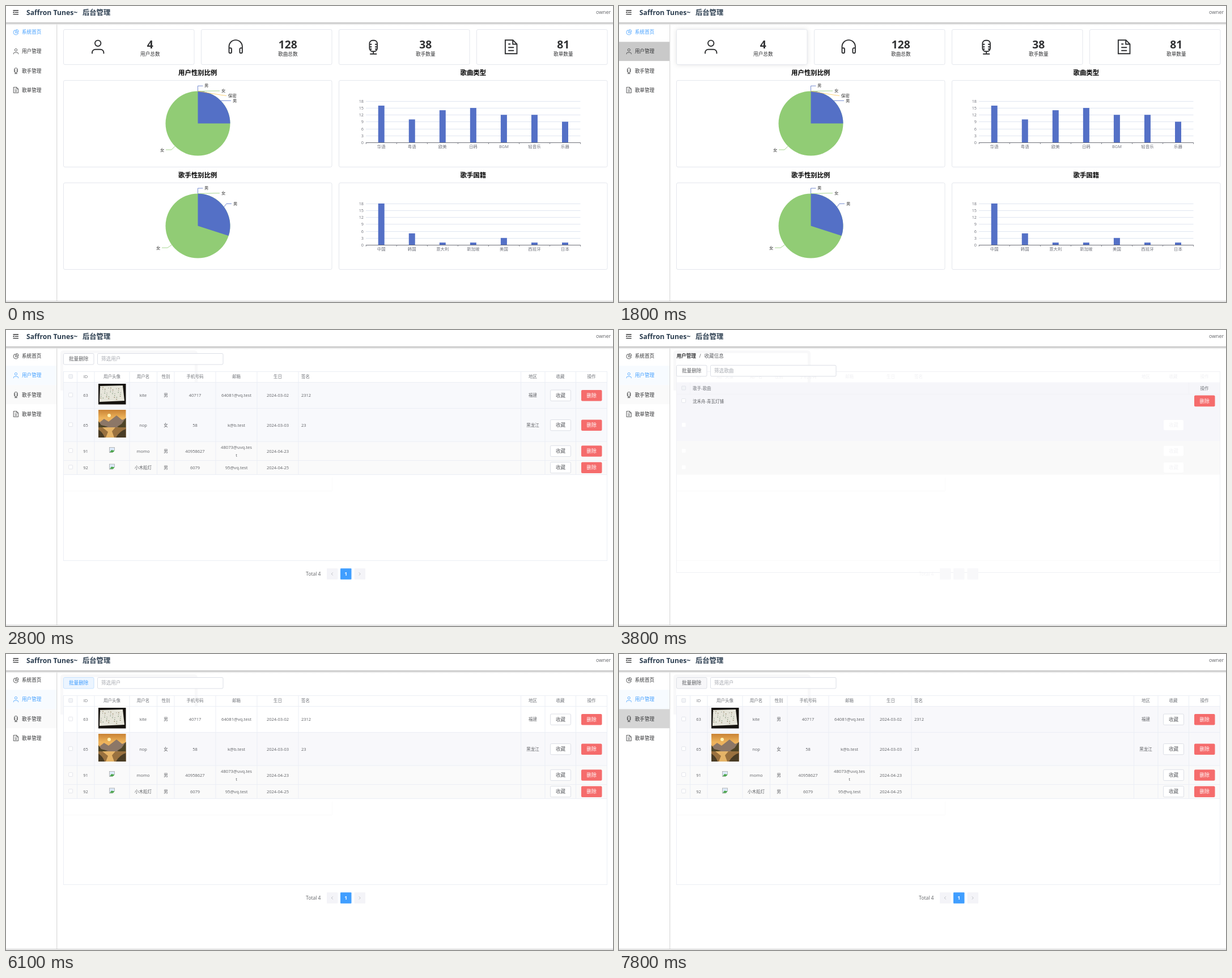
Animation, 1071 px wide and 523 px high, one loop 8000 ms. Source, as an HTML page:

```html
<!DOCTYPE html>
<html lang="zh">
<head>
<meta charset="utf-8">
<title>后台管理</title>
<style>
html, body { margin: 0; width: 100%; height: 100%; overflow: hidden; background: #fff; }
svg { display: block; width: 1071px; height: 523px; font-family: "Open Sans", "Noto Sans CJK SC", "Noto Sans CJK", sans-serif; }
text { white-space: pre; }
</style>
</head>
<body>
<svg id="stage" viewBox="0 0 1071 523"></svg>
<script>
const LOOP = 8000, BLUE = '#409eff', INK = '#303133', GREY = '#606266', LINE = '#ebeef5';

// Drawing helpers, all returning SVG markup
const text = (x, cy, s, size, fill = GREY, anchor = 'middle', extra = '') =>
  `<text x="${x}" y="${cy + size * .37}" font-size="${size}" fill="${fill}" text-anchor="${anchor}" ${extra}>${s}</text>`;
const box = (x, y, x2, y2, fill = 'none', stroke = 'none', r = 0, extra = '') =>
  `<rect x="${x}" y="${y}" width="${x2 - x}" height="${y2 - y}" rx="${r}" fill="${fill}" stroke="${stroke}" ${extra}/>`;
const path = (d, stroke, w = 1, extra = '') =>
  `<path d="${d}" fill="none" stroke="${stroke}" stroke-width="${w}" ${extra}/>`;
const group = (id, body, extra = '') => `<g id="${id}" ${extra}>${body}</g>`;

// Icons are centred on 0,0 in a 24 px square
const ICONS = {
  pie: 'M-2-9.5A10.5 10.5 0 1 0 10 3H-2ZM2.5-11.5A9.5 9.5 0 0 1 11.5-2H2.5Z',
  person: 'M-5.2-6.5a5.2 5.2 0 1 0 10.4 0a5.2 5.2 0 1 0-10.4 0M-10.2 12v-2a5.5 5.5 0 0 1 5.5-5.5h9.4a5.5 5.5 0 0 1 5.5 5.5v2',
  phones: 'M-11.7 4v-4.5a11.7 11.7 0 0 1 23.4 0V4M-11.7 2h2.5a2 2 0 0 1 2 2v5a2 2 0 0 1-2 2h-.5a2 2 0 0 1-2-2ZM11.7 2h-2.5a2 2 0 0 0-2 2v5a2 2 0 0 0 2 2h.5a2 2 0 0 0 2-2Z',
  mic: 'M-6.8-6a5.5 5.5 0 0 1 5.5-5.5h2.6a5.5 5.5 0 0 1 5.5 5.5v8.5a5.5 5.5 0 0 1-5.5 5.5h-2.6a5.5 5.5 0 0 1-5.5-5.5ZM-6.8-4.5h4M2.8-4.5h4M-6.8 0h4M2.8 0h4M-6.8 4h4M2.8 4h4M0 8v4.5M-6 12.5H6',
  doc: 'M-10.3-12h13.5l7.1 7V12h-20.6ZM3-12v7.2h7M-5-5h4M-5 1h10M-5 6.5h10'
};
const icon = (name, x, y, k = 1, stroke = 'currentColor') =>
  `<g transform="translate(${x} ${y}) scale(${k})">${path(ICONS[name], stroke, 1.9)}</g>`;

function frame() {
  const items = [['pie', '系统首页'], ['person', '用户管理'], ['mic', '歌手管理'], ['doc', '歌单管理']];
  const menu = items.map(([name, label], i) => {
    const y = 46.2 + 34.1 * i;
    return box(0, y - 17, 89, y + 17, '#fff', 'none', 0, `id="row${i}"`) +
      group('item' + i, icon(name, 17.5, y, .41) + text(28, y, label, 8.6, 'currentColor', 'start'), `color="${INK}"`);
  }).join('');
  return menu +
    path('M89.5 30V521', '#dcdcdc') + path('M90.5 30V521', '#f4f4f4') +
    box(0, 0, 1071, 29, '#fff') +
    box(0, 29, 1071, 35, 'url(#shade)') +
    path('M12.5 8H22M15.5 11.3H22M12.5 14.6H22', INK, 1.3) + '<path d="M12 11.3l2.4-1.7v3.4z" fill="#303133"/>' +
    text(36, 11.5, 'Saffron Tunes~', 12.2, '#2c3e50', 'start', 'font-weight="700"') +
    text(135, 11.5, '后台管理', 12.3, '#2c3e50', 'start', 'font-weight="700"') +
    text(1067, 11, 'owner', 8.8, GREY, 'end') +
    path('M0 521.5H1071', '#c4c4c4');
}

function pie(cy, share, labels) {
  const cx = 338.5, r = 57, a = share * 2 * Math.PI;
  const x = cx + r * Math.sin(a), y = cy - r * Math.cos(a);
  return `<circle cx="${cx}" cy="${cy}" r="${r}" fill="#91cc75"/>` +
    `<path d="M${cx} ${cy}V${cy - r}A${r} ${r} 0 0 1 ${x} ${y}Z" fill="#5470c6"/>` +
    labels.map(([d, stroke, tx, ty, s, anchor = 'start']) =>
      path(d, stroke, .8) + text(tx, ty, s, 7.4, '#333', anchor)).join('');
}

function bars(base, values, names) {
  let out = '';
  for (let i = 0; i <= 6; i++) {
    const y = Math.round(base - i * 12.17) + .5;
    if (i) out += path(`M635 ${y}H1013.5`, '#e0e6f1');
    out += text(631, y - .5, i * 3, 7.3, '#6e7079', 'end');
  }
  values.forEach((v, i) => {
    const x = 662.2 + 54.05 * i;
    out += box(x - 5.5, base - v * 4.06, x + 5.5, base, '#5470c6') + text(x, base + 7.5, names[i], 7.4, '#6e7079');
  });
  out += path(`M635 ${base + .5}H1013.5`, '#6e7079');
  for (let i = 0; i < 8; i++) out += path(`M${635.3 + i * 54.05} ${base}v3`, '#6e7079', .8);
  return out;
}

function home() {
  const cards = [['person', 4, '用户总数'], ['phones', 128, '歌曲总数'], ['mic', 38, '歌手数量'], ['doc', 81, '歌单数量']];
  const titles = ['用户性别比例', '歌曲类型', '歌手性别比例', '歌手国籍'];
  let out = box(101.5, 41.5, 332, 103.5, '#fff', 'none', 2, 'id="glow" style="filter:drop-shadow(0 0 4px rgba(0,0,0,.12))"');
  cards.forEach(([name, n, label], i) => {
    const x = 101.5 + 243 * i;
    out += box(x, 41.5, x + 230.5, 103.5, '#fff', '#e4e7ed', 2.5) + icon(name, x + 60.7, 72.3, 1, INK) +
      text(x + 152.8, 67.8, n, 19.3, INK, 'middle', 'font-weight="700"') + text(x + 152.8, 85.3, label, 8.6, INK);
  });
  titles.forEach((s, i) => {
    const x = i % 2 ? 587.5 : 101.5, y = i > 1 ? 312 : 131;
    out += text(x + 236.8, y - 13.2, s, 11.4, '#000', 'middle', 'font-weight="700"') +
      box(x, y + .5, x + 473.5, y + 153.5, '#fff', '#e4e7ed', 2.5);
  });
  const b = '#5470c6', g = '#91cc75', y = '#fac858';
  return out +
    pie(207.5, .25, [
      ['M338.5 150.5V141.2H347.5', b, 350, 140.5, '男'],
      ['M338.5 150.5L369 150H377', g, 380, 149, '女'],
      ['M338.5 150.5L381 157.5L389 158.5', y, 392, 158, '保密'],
      ['M378.8 167.2H397', b, 400, 166.8, '男'],
      ['M298.2 247.8L292 254H282', g, 279.5, 253.8, '女', 'end']]) +
    pie(388.5, .3, [
      ['M338.5 331.5V322H347.5', b, 350, 321.3, '男'],
      ['M338.5 331.5L369 330.7H377', g, 380, 329.8, '女'],
      ['M384.6 355L389 349.3H398', b, 401, 349, '男'],
      ['M292.4 422L285 427.2H275', g, 272.5, 426.8, '女', 'end']]) +
    bars(241, [16, 10, 14, 15, 12, 12, 9], ['华语', '粤语', '欧美', '日韩', 'BGM', '轻音乐', '乐器']) +
    bars(422, [18, 5, 1, 1, 3, 1, 1], ['中国', '韩国', '意大利', '新加坡', '美国', '西班牙', '日本']);
}

const check = (y, fill = '#fff') => box(110.7, y - 3.4, 117.6, y + 3.4, fill, '#dcdfe6', 1, 'stroke-width=".8"');
const remove = y => box(1015, y - 9.8, 1051.5, y + 9.8, '#f56c6c', 'none', 2) + text(1033.2, y, '删除', 8.6, '#fff', 'middle', 'font-weight="500"');
const halo = path('M98.5 107V42Q98.5 38.5 102 38.5H331Q335.5 38.5 335.5 42V104', '#f8f8f9', 5) +
  path('M102 284.5H575.5V261', '#fafafa');
const toolbar = (y, hint, id) =>
  box(101.5, y, 155, y + 19.5, '#fff', '#dcdfe6', 2, `id="${id}"`) +
  text(128.2, y + 9.8, '批量删除', 8.6, GREY, 'middle', `id="${id}Text"`) +
  box(161.5, y, 383, y + 19.5, '#fff', '#dcdfe6', 2) + text(168, y + 9.8, hint, 8.6, '#a8abb2', 'start');

const HEAD = [[140.5, 'ID'], [187, '用户头像'], [242, '用户名'], [282, '性别'], [333.5, '手机号码'], [406.5, '邮箱'],
  [479.5, '生日'], [528.5, '签名'], [929.5, '地区'], [978, '收藏'], [1033, '操作']];
const head = fill => HEAD.map(([x, s]) => text(x, 82.7, s, 7.5, fill, 'middle', 'font-weight="500"')).join('');

function pictures() {
  const specks = [];
  for (let i = 0; i < 34; i++) {
    const x = 167 + (i * 17.3) % 38, y = 101.5 + (i * 7.7) % 22;
    specks.push(`<circle cx="${x}" cy="${y}" r="${.5 + i % 3 * .25}" fill="${['#555', '#6d8b6a', '#a89a80'][i % 3]}"/>`);
  }
  return box(163, 95, 211.5, 131.5, '#16130f') +
    '<path d="M166 99L206 98L209 125L165 127Z" fill="#e6e5da"/>' + specks.join('') +
    box(163, 141, 211.5, 190, 'url(#dusk)') + '<circle cx="182" cy="151" r="3" fill="#fff0b0"/>' +
    '<path d="M163 165L173 157L181 162L195 151L205 159L211.5 156V172H163Z" fill="#8c7767"/>' +
    '<path d="M163 161L168 168L180 171L163 174ZM211.5 155L204 166L196 171L211.5 176Z" fill="#4d4427"/>' +
    box(163, 172, 211.5, 190, '#99713f') + '<path d="M170 172H193L187 179L191 190H176L180 180Z" fill="#e5b468"/>' +
    '<path d="M163 176Q171 181 174 190H163ZM211.5 175Q201 178 194 190H211.5Z" fill="#493c25"/>' +
    [212, 241.5].map(y => box(182.5, y - 4.5, 191.5, y + 4.5, '#dce9f8', '#aaa', 0, 'stroke-width=".8"') +
      `<path d="M183 ${y + 4}l3-4 5 1v3z" fill="#4ea64e"/><path d="M188 ${y + 5}l4-4v4z" fill="#fff"/>`).join('');
}

function people() {
  const rows = [
    [115.5, 63, 'kite', '男', '40717', ['64081@vq.test'], '2024-03-02', '2312', '福建'],
    [168, 65, 'nop', '女', '58', ['k@b.test'], '2024-03-03', '23', '黑龙江'],
    [213.8, 91, 'momo', '男', '40958627', ['48073@uvq.tes', 't'], '2024-04-23', '', ''],
    [243, 92, '小木船灯', '男', '6079', ['95@vq.test'], '2024-04-25', '', '']];
  const ys = [92.5, 138.5, 197, 230.5, 255.5];
  let out = halo + toolbar(41.5, '筛选用户', 'btn') + box(101.5, 73.5, 1060.5, 407.5, 'none', LINE);
  rows.forEach((r, i) => out += box(102, ys[i], 1060, ys[i + 1], '#fff', 'none', 0, `id="band${i}"`));
  ys.forEach(y => out += path(`M102 ${y}H1060`, LINE));
  [125.5, 156, 218, 266.5, 297, 370, 443, 516, 908.5, 951, 1005.5].forEach(x => out += path(`M${x} 73V255.5`, LINE));
  out += check(82, '#f2f4f7') + head('#73767c') + pictures();
  rows.forEach(([y, id, name, sex, phone, mail, born, sign, area], i) => {
    [[140.5, id], [242, name], [282, sex], [333.5, phone], [479.5, born], [929.5, area]]
      .forEach(([x, s]) => out += text(x, y, s, 7.5));
    mail.forEach((s, k) => out += text(406.5, y + (k - (mail.length - 1) / 2) * 14, s, 7.7));
    out += text(521, y, sign, 7.5, GREY, 'start') + check(y - .8) +
      box(960.5, y - 9.5, 996.5, y + 9.8, '#fff', '#dcdfe6', 2, `id="fav${i}"`) +
      text(978.5, y + .2, '收藏', 8.6, GREY, 'middle', `id="favText${i}"`) + remove(y + .2);
  });
  [566, 590, 614.5].forEach((x, i) => out += box(x, 421.3, x + 19.5, 440.7, i == 1 ? BLUE : '#f4f4f8', 'none', 1));
  return out + text(542.3, 431, 'Total 4', 8.6) +
    text(599.7, 431, '1', 8.6, '#fff', 'middle', 'font-weight="700"') +
    path('M576.7 428.5l-2.5 2.5 2.5 2.5M622.8 428.5l2.5 2.5-2.5 2.5', '#b6b9c0', .9);
}

function songs() {
  let out = halo + box(102, 92.5, 1060, 196, '#f6f6fa') + box(102, 196, 1060, 255.5, '#f9f9f9') + head('#f0f0f3') +
    path('M102 73.5H1060M102 113.5H1060M125.5 93V113M1005.5 93V113', '#f1f2f6') +
    path('M102 407.5H1060', '#fafafa') + box(101.5, 73.5, 1060.5, 428.5, 'none', '#f0f1f5');
  [168, 213.8, 243].forEach(y => out += box(961, y - 9, 996, y + 9, '#fff', 'none', 2) +
    text(978.5, y, '收藏', 8.6, '#f3f3f5') + box(111, y - 4, 117.5, y + 3, '#fff', 'none', 1));
  [566, 590, 614.5].forEach(x => out += box(x, 421.3, x + 19.5, 440.7, '#f8f8fa', 'none', 1));
  return out + text(542.3, 431, 'Total 4', 8.6, '#f4f4f6') +
    text(101.5, 45.8, '用户管理', 8.6, INK, 'start', 'id="crumb" font-weight="700"') +
    text(143, 45.8, '/', 8.6, GREY) + text(150.5, 45.8, '收藏信息', 8.6, GREY, 'start') +
    toolbar(62.3, '筛选歌曲', 'btn2') +
    check(102.5, '#f2f4f7') + check(124.8) + text(130, 103.2, '歌手-歌曲', 7.5, '#73767c', 'start', 'font-weight="500"') +
    text(1033, 103.2, '操作', 7.5, '#73767c') + text(130, 125.8, '沈禾舟-青瓦灯铺', 7.5, GREY, 'start') + remove(125.4);
}

const stage = document.getElementById('stage');
stage.innerHTML = `<defs>
<linearGradient id="shade" x2="0" y2="1"><stop stop-color="#bdbdbd"/><stop offset=".35" stop-color="#d5d5d5"/><stop offset="1" stop-color="#fff" stop-opacity="0"/></linearGradient>
<linearGradient id="dusk" x2="0" y2="1"><stop stop-color="#c98234"/><stop offset=".3" stop-color="#eeb45b"/><stop offset=".7" stop-color="#dca36a"/></linearGradient>
</defs>` + group('home', home()) + group('people', people()) + group('songs', songs()) + frame();

// [id, attribute, time, value, time, value, ...]; each value holds until the next
const TRACKS = [
  ['home', 'display', 0, 'inline', 2000, 'none'],
  ['people', 'display', 0, 'none', 2000, 'inline', 3600, 'none', 6100, 'inline'],
  ['songs', 'display', 0, 'none', 3600, 'inline', 6100, 'none'],
  ['glow', 'opacity', 0, 0, 500, 1],
  ['row1', 'fill', 0, '#fff', 500, '#f5f5f5', 1100, '#e3e3e3', 1200, '#d6d6d6', 1300, '#d0d0d0', 1700, '#cbcbcb',
    1800, '#c9c9c9', 2100, '#dde2e7', 2200, '#ecf2f8', 2300, '#f7fbff'],
  ['row2', 'fill', 0, '#fff', 300, '#f5f5f5', 500, '#fff', 2200, '#f4f4f4', 2400, '#fafafa', 7800, '#d5d5d5'],
  ['item0', 'color', 0, BLUE, 2000, '#34506c', 2100, INK],
  ['item1', 'color', 0, INK, 2000, '#3a78b2', 2100, BLUE],
  ['band0', 'fill', 0, '#fff', 2200, '#f8f9fc', 6100, '#fff', 6300, '#f8f8fb'],
  ['band1', 'fill', 0, '#fff', 2300, '#f8f9fc', 6100, '#f8f8fb'],
  ['band2', 'fill', 0, '#fff', 2300, '#fafafa'],
  ['band3', 'fill', 0, '#fff', 2400, '#fafafa'],
  ['favText0', 'fill', 0, GREY, 3300, '#5080b2', 3400, BLUE, 3600, GREY],
  ['fav0', 'fill', 0, '#fff', 3300, '#f5faff', 3400, '#ecf5ff', 3600, '#fff'],
  ['btn2', 'fill', 0, '#fff', 5600, '#ecf5ff', 5800, '#fff'],
  ['btn2Text', 'fill', 0, GREY, 5600, BLUE, 5800, GREY],
  ['crumb', 'fill', 0, INK, 5800, '#3868a0', 5900, BLUE],
  ['btn', 'fill', 0, '#fff', 6100, '#ecf5ff', 6300, '#f2f6fa', 6400, '#f7f7f9'],
  ['btn', 'stroke', 0, '#dcdfe6', 6100, '#c6e2ff', 6400, '#dcdfe6'],
  ['btnText', 'fill', 0, GREY, 6100, BLUE, 6300, '#5080b2', 6400, GREY]
].map(([id, attr, ...steps]) => ({ el: document.getElementById(id), attr, steps }));

function draw(t) {
  for (const { el, attr, steps } of TRACKS) {
    let i = 0;
    while (i + 2 < steps.length && steps[i + 2] <= t) i += 2;
    el.setAttribute(attr, steps[i + 1]);
  }
}
const start = performance.now();
function tick() {
  draw((performance.now() - start) % LOOP);
  requestAnimationFrame(tick);
}
draw(0);
tick();
</script>
</body>
</html>
```
